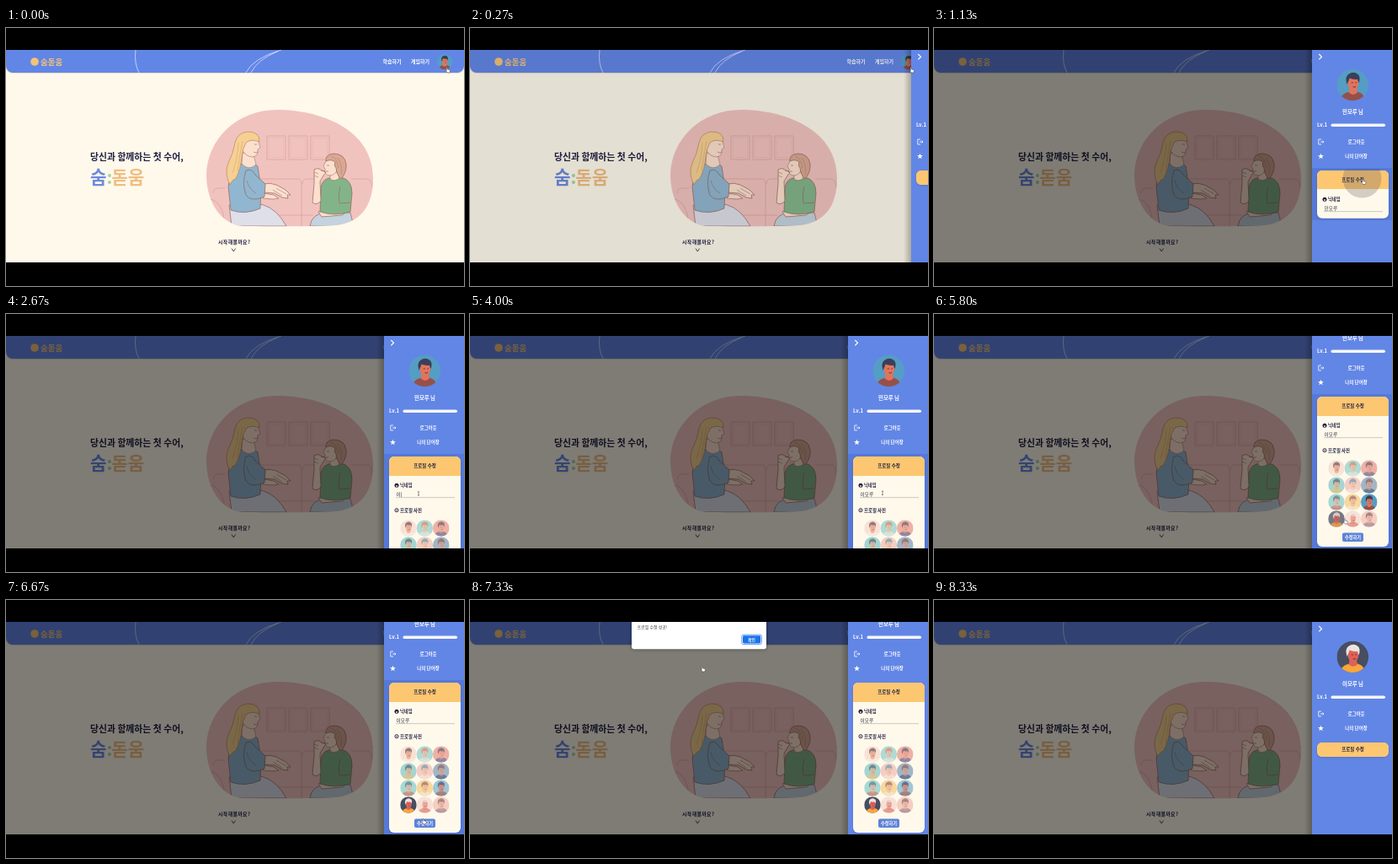
An HTML page with a canvas that plays this animation: 544x306 px, repeating every 9340 ms.

```html
<!DOCTYPE html>
<html lang="ko">
<head>
<meta charset="utf-8">
<title>프로필 수정</title>
<style>
html, body { margin: 0; width: 100%; height: 100%; overflow: hidden; background: #000; }
canvas { display: block; width: 544px; height: 306px; }
</style>
</head>
<body>
<canvas id="stage" width="544" height="306"></canvas>
<script>
const ctx = document.getElementById('stage').getContext('2d');
const LOOP = 9340;
const FONT = '"Noto Sans CJK KR", "Noto Sans CJK", sans-serif';
const BLUE = '#6286e6', CREAM = '#fef9eb', GOLD = '#fdc771', NAVY = '#201e42';
const LINE = '#94635c', SKIN = '#fbe0cd';
const OLD_NAME = '민모루', NEW_NAME = '이모루';

const OLD_FACE = ['#559dc4', '#38405a', '#e2745c', '#96504a'];
const NEW_FACE = ['#474e61', '#ece4df', '#df6258', '#f9a63c'];
// background, hair, skin, clothes
const FACES = [
  ['#f5cfc4', '#4b4350', '#e8906f', '#f4f0e8'], ['#6fc3bf', '#e8705c', '#f5c3a5', '#f0efe9'], ['#e2766f', '#3f506f', '#f0a68a', '#46689a'],
  ['#5fb9ba', '#3a5270', '#f0ad83', '#f3c166'], ['#efa9a2', '#4890b0', '#f2c3a4', '#f4efe4'], ['#5a7ea6', '#7c4f50', '#e5a183', '#36527a'],
  ['#62bfc0', '#54617a', '#f0b394', '#df5f57'], ['#f4bd5c', '#85536a', '#efb69a', '#f0efe9'], OLD_FACE,
  NEW_FACE, ['#f1ccc5', '#f3efe8', '#e58270', '#d7655e'], ['#eeaaa1', '#6d5562', '#eab094', '#88738a']
];

const clamp = (v, a = 0, b = 1) => Math.min(b, Math.max(a, v));
const span = (t, from, length) => clamp((t - from) / length);
const ease = p => p * p * (3 - 2 * p);

// Interpolates rows of [time, value, value...]
function track(rows, t, curve = p => p) {
  let i = 0;
  while (i < rows.length - 2 && t >= rows[i + 1][0]) i++;
  const a = rows[i], b = rows[i + 1], p = curve(span(t, a[0], b[0] - a[0]));
  return a.slice(1).map((v, k) => v + (b[k + 1] - v) * p);
}

function paint(fill, stroke, width = 0.7) {
  if (fill) { ctx.fillStyle = fill; ctx.fill(); }
  if (stroke) { ctx.strokeStyle = stroke; ctx.lineWidth = width; ctx.stroke(); }
}

function rect(x, y, w, h, r, fill, stroke, width) {
  ctx.beginPath();
  ctx.roundRect(x, y, w, h, r);
  paint(fill, stroke, width);
}

function disc(x, y, r, fill, stroke, width) {
  ctx.beginPath();
  ctx.arc(x, y, r, 0, 7);
  paint(fill, stroke, width);
}

function oval(x, y, rx, ry, fill) {
  ctx.beginPath();
  ctx.ellipse(x, y, rx, ry, 0, 0, 7);
  paint(fill);
}

function path(d, fill, stroke, width = 0.7) {
  const p = new Path2D(d);
  if (fill) { ctx.fillStyle = fill; ctx.fill(p); }
  if (stroke) { ctx.strokeStyle = stroke; ctx.lineWidth = width; ctx.stroke(p); }
}

function text(s, x, y, size, color, weight = 700, align = 'left', spacing = 0) {
  ctx.font = `${weight} ${size}px ${FONT}`;
  ctx.fillStyle = color;
  ctx.textAlign = align;
  ctx.letterSpacing = spacing + 'px';
  ctx.fillText(s, x, y + size * 0.36);
  ctx.letterSpacing = '0px';
}

function clipped(shape, draw) {
  ctx.save();
  ctx.beginPath();
  shape();
  ctx.clip();
  draw();
  ctx.restore();
}

function portrait(x, y, r, [bg, hair, skin, top]) {
  clipped(() => ctx.arc(x, y, r, 0, 7), () => {
    ctx.translate(x, y);
    ctx.scale(r, r);
    ctx.fillStyle = bg;
    ctx.fillRect(-1, -1, 2, 2);
    path('M-.85 1Q-.75 .55-.2 .42L.3 .42Q.75 .55 .82 1Z', top);
    path('M-.2 .15L-.24 .48Q.04 .75 .3 .46L.24 .1Z', skin);
    oval(0.03, -0.16, 0.35, 0.48, skin);
    path('M-.36-.02Q-.5-.5-.28-.66Q.1-.92.38-.62Q.5-.4.38-.12L.3-.36Q.02-.32-.2-.42Q-.26-.2-.36-.02Z', hair);
    path('M-.08-.14H.02M.16-.14H.24M.02 .12Q.12 .17.2 .1', null, '#4b3438', 0.05);
  });
}

function blob() {
  ctx.moveTo(238, 174);
  ctx.bezierCurveTo(239, 132, 274, 97, 322, 97);
  ctx.bezierCurveTo(372, 97, 436, 119, 436, 178);
  ctx.bezierCurveTo(436, 214, 419, 231, 391, 234);
  ctx.bezierCurveTo(350, 236, 315, 235, 283, 235);
  ctx.bezierCurveTo(256, 234, 238, 207, 238, 174);
}

function room() {
  const c = '#dca39d';
  for (const x of [310, 336, 362]) {
    rect(x, 128, 22, 28, 0, null, c, 0.8);
    rect(x + 2.5, 130.5, 17, 23, 0, null, '#e6b2ac', 0.5);
  }
  path('M246 196Q246 190 253 190H260M302 179H346Q351 179 351 185V235M352 185Q352 179 358 179H370M410 179H428Q435 179 435 190M320 222H365M242 203Q258 205 260 235', null, c, 0.8);
}

function woman() {
  path('M265 210Q288 204 306 210Q322 215 333 235H268Z', '#dedfe9', LINE);
  path('M276 163Q266 170 264 188L267 216Q284 222 302 214L303 190L299 164Q289 155 276 163Z', '#91b6cf', LINE);
  path('M281 148L280 161Q288 170 297 162L294 150Z', SKIN, LINE, 0.5);
  path('M283 129Q291 125 299 131L302 142L299 144Q300 152 293 153Q283 152 280 143Z', SKIN, LINE, 0.5);
  path('M301 135Q302 123 287 123Q275 124 272 136Q270 149 264 160Q259 173 266 186Q270 178 272 180Q279 168 280 153Q281 143 285 136Q291 131 301 135Z', '#f6d092', '#bb8662', 0.7);
  path('M276 136Q275 156 269 172M281 134Q277 154 275 170', null, '#d9a66d', 0.6);
  path('M305 185Q314 183 321 186L332 192L338 198L334 198L335 202L328 201L319 196L306 195Z', SKIN, LINE);
  path('M321 190L333 197M317 192L328 199', null, LINE, 0.5);
  path('M306 196L318 198L324 202L317 203L305 202Z', SKIN, LINE, 0.6);
  path('M285 169Q292 166 296 174L308 185L307 200Q291 207 285 198Q280 184 285 169Z', '#91b6cf', LINE);
  path('M286 181Q289 192 297 196', null, LINE, 0.5);
  path('M295 138H298M294 147Q297 149 299 147', null, LINE, 0.6);
}

function girl() {
  path('M361 235Q363 220 380 219L409 219L413 235Z', '#c4d3df', LINE);
  path('M398 202L409 204Q409 217 399 222L375 224L371 218L394 213Z', SKIN, LINE);
  path('M383 178Q374 181 374 192L373 218Q390 224 409 218L411 196Q411 180 398 177Z', '#83b489', LINE);
  path('M385 172V179Q390 183 396 178L394 171Z', SKIN, LINE, 0.5);
  path('M381 156L377 164L379 167Q378 174 384 175Q392 175 394 166L391 155Z', SKIN, LINE, 0.5);
  path('M380 158Q379 150 389 149Q402 149 404 161Q405 171 398 179Q393 175 392 166Q389 163 391 159Q386 155 380 158Z', '#d9a893', LINE);
  path('M394 154Q400 162 398 174M386 152Q393 154 395 166', null, '#b98071', 0.6);
  path('M366 168Q371 165 375 169L380 171L377 175L373 182L374 205Q369 211 364 207L366 184Z', SKIN, LINE);
  path('M366 171L371 173M366 175L371 177M374 169L379 170', null, LINE, 0.5);
  path('M397 188Q394 198 396 208L409 207', null, LINE, 0.6);
  path('M381 163H384M380 170H383', null, LINE, 0.6);
}

function page() {
  ctx.fillStyle = CREAM;
  ctx.fillRect(0, 26, 544, 252);
  rect(0, 26, 544, 28, [0, 0, 8, 8], '#e9dfd0');
  rect(0, 26, 544, 27, [0, 0, 8, 8], BLUE);
  path('M154 26Q152 42 158 53M327 26Q293 36 285 53M323 27.5Q298 38 291 53', null, 'rgba(255,255,255,.75)', 0.8);
  disc(34, 40, 4.8, '#f3c37a');
  text('숨돋움', 41, 40.3, 9.5, '#f6c277');
  text('학습하기', 447.5, 40, 6, '#fff');
  text('게임하기', 481, 40, 6, '#fff');
  portrait(521, 40, 9.3, OLD_FACE);

  text('당신과 함께하는 첫 수어,', 100, 152.8, 10.85, NAVY);
  text('숨', 100, 177.5, 21.2, '#6b8ae0');
  text(':', 119.5, 177.5, 21.2, '#a9d3a0');
  text('돋움', 125.2, 177.5, 21.2, '#f1bd80');

  clipped(blob, () => {
    ctx.fillStyle = '#f1c3bf';
    ctx.fillRect(236, 95, 202, 142);
    room();
    woman();
    girl();
  });
  text('시작해볼까요?', 252, 254, 5.9, NAVY, 700, 'left', 0.4);
  path('M268 261.5L270.3 265L272.6 261.5', null, NAVY, 0.8);
}

function typed(t) {
  if (t < 2470) return OLD_NAME;
  if (t < 2670) return '';
  if (t < 3400) return '이';
  if (t < 3600) return '이모';
  return t < 3730 ? '이모ㄹ' : NEW_NAME;
}

function panel(t, open, head, bottom) {
  const y = 169, h = bottom - y;
  ctx.save();
  ctx.shadowColor = 'rgba(20,30,90,.18)';
  ctx.shadowBlur = 3;
  ctx.shadowOffsetY = 1;
  rect(455, y, 85, h, 6, open > 0 ? CREAM : GOLD);
  ctx.restore();
  clipped(() => ctx.roundRect(455, y, 85, h, 6), () => {
    ctx.fillStyle = GOLD;
    ctx.fillRect(455, y, 85, head);
    text('프로필 수정', 497.5, y + head / 2 - 0.1, 5.5, NAVY, 700, 'center');
    if (!open) return;
    // Form content is revealed below the header.
    clipped(() => ctx.rect(455, y + head, 85, 400), () => form(t));
  });
}

function form(t) {
  disc(464, 203.3, 2.5, NAVY);
  rect(463.1, 203.2, 1.8, 1.6, 0.4, CREAM);
  text('닉네임', 468, 203.5, 5.3, NAVY);
  text(typed(t), 463.6, 214, 5.6, '#37354b', 400);
  if (t >= 2670 && t < 3130) {
    ctx.fillStyle = '#555';
    ctx.fillRect(469, 211.5, 0.6, 5.5);
  }
  ctx.fillStyle = '#a9a7a0';
  ctx.fillRect(463, 217.5, 70, 0.6);

  disc(464, 232.7, 2.1, null, NAVY, 0.9);
  disc(464, 232.7, 0.7, NAVY);
  text('프로필 사진', 468, 233.2, 5.4, NAVY);

  const chosen = t < 6200 ? 8 : 9;
  FACES.forEach((face, i) => {
    const hover = i === 9 && t > 5500;
    ctx.globalAlpha = i === chosen ? 1 : hover ? 0.75 : 0.55;
    portrait(478 + (i % 3) * 19.4, 254 + Math.floor(i / 3) * 20, 9.8, face);
  });
  ctx.globalAlpha = 1;
  rect(485, 330.5, 25, 10.5, 2, '#5d82d8');
  text('수정하기', 497.5, 335.8, 5.2, '#fff', 700, 'center');
}

function sidebar(t) {
  const slide = ease(span(t, 200, 240));
  if (!slide) return;
  ctx.fillStyle = `rgba(0,0,0,${0.5 * slide})`;
  ctx.fillRect(0, 26, 544, 252);

  const opening = ease(span(t, 1050, 250)), closing = ease(span(t, 8070, 220));
  const open = opening * (1 - closing);
  const head = 17 + 6 * ease(span(t, 1050, 110)) * (1 - closing);
  const bottom = 186 + 161 * open;
  const wheel = track([[4530, 0], [4730, 35], [5130, 71]], t)[0];
  const scroll = Math.min(wheel, Math.max(0, bottom + 2 - 278));
  const saved = t >= 8070;

  ctx.save();
  ctx.translate(95 * (1 - slide), 0);
  const shade = ctx.createLinearGradient(440, 0, 449, 0);
  shade.addColorStop(0, 'rgba(0,0,0,0)');
  shade.addColorStop(1, 'rgba(0,0,0,.25)');
  ctx.fillStyle = shade;
  ctx.fillRect(440, 26, 9, 252);
  ctx.fillStyle = BLUE;
  ctx.fillRect(449, 26, 95, 252);

  ctx.translate(0, -scroll);
  if (t > 1050 && t < 6900) {
    ctx.fillStyle = '#5579d8';
    ctx.fillRect(449, 166, 95, bottom - 164);
  }
  path('M457.3 31L460.5 34.2L457.3 37.4', null, '#fff', 1.2);
  portrait(497.3, 67.5, 18.8, saved ? NEW_FACE : OLD_FACE);
  text((saved ? NEW_NAME : OLD_NAME) + ' 님', 497.5, 100, 6.4, '#fff', 700, 'center');
  text('Lv.1', 455, 115.2, 6, '#fff');
  rect(471.5, 113.5, 64.5, 3.6, 1.8, '#f9f8f5');
  path('M460 132H456.8V138H460M459 135H463M461.5 133.5L463 135L461.5 136.5', null, '#fff', 0.8);
  text('로그아웃', 501.5, 135, 5.5, '#fff', 700, 'center');
  ctx.beginPath();
  for (let i = 0; i < 10; i++) {
    const a = i * Math.PI / 5 - Math.PI / 2, r = i % 2 ? 1.5 : 3.6;
    ctx.lineTo(459.5 + r * Math.cos(a), 152.3 + r * Math.sin(a));
  }
  paint('#fff');
  text('나의 단어장', 501.5, 152.2, 5.5, '#fff', 700, 'center');
  panel(t, open, head, bottom);
  ripple(t);
  ctx.restore();
}

function ripple(t) {
  const p = span(t, 1000, 400);
  if (p <= 0 || p >= 1) return;
  clipped(() => ctx.rect(450, 167, 94, 111), () => {
    disc(508.5, 178.5, 23 * clamp(p / 0.3), `rgba(95,85,90,${0.4 * (1 - p)})`);
  });
}

function alertBox(t) {
  if (t < 7070 || t >= 8000) return;
  ctx.save();
  ctx.shadowColor = 'rgba(0,0,0,.4)';
  ctx.shadowBlur = 4;
  rect(192, 26, 160, 32.3, [0, 0, 3, 3], '#fff');
  ctx.restore();
  text('프로필 수정 성공!', 198.5, 32.3, 5, '#3c4043', 400);
  rect(322.8, 41.2, 23.6, 11.4, 2, '#fff', '#3b82ea', 0.8);
  rect(324, 42.3, 21.2, 9.2, 1.4, '#1a73e8');
  text('확인', 334.6, 46.8, 4.8, '#fff', 700, 'center');
}

const MOVES = [
  [0, 523, 47], [430, 523, 47], [930, 508.5, 179.5], [2070, 508.5, 179.5],
  [2330, 490, 213], [4900, 490, 212], [5600, 487, 243], [6000, 487, 243],
  [6180, 482, 243], [6350, 482, 243], [6800, 498, 264], [7050, 498, 264],
  [7330, 275, 79], [7750, 335, 47], [8070, 335, 47]
];

function pointer(t) {
  if (t >= 8070) return;
  const [x, y] = track(MOVES, t, ease);
  ctx.save();
  ctx.translate(x, y);
  if (t > 2300 && t < 4500) {
    path('M-1-2.2H1M0-2.2V2.2M-1 2.2H1', null, '#44434d', 0.6);
  } else {
    path('M0 0Q.8-.5 1.3.4L1.6 2L4 2.6Q4.7 3 4.4 4.2L3.8 6H1.2L-.6 3.8L.4 3.3Z', '#fff', '#33313c', 0.5);
  }
  ctx.restore();
}

function draw(now) {
  const t = now % LOOP;
  ctx.fillStyle = '#000';
  ctx.fillRect(0, 0, 544, 306);
  clipped(() => ctx.rect(0, 26, 544, 252), () => {
    page();
    sidebar(t);
    alertBox(t);
    pointer(t);
  });
}

const start = performance.now();
function tick() {
  draw(performance.now() - start);
  requestAnimationFrame(tick);
}
tick();
</script>
</body>
</html>
```
